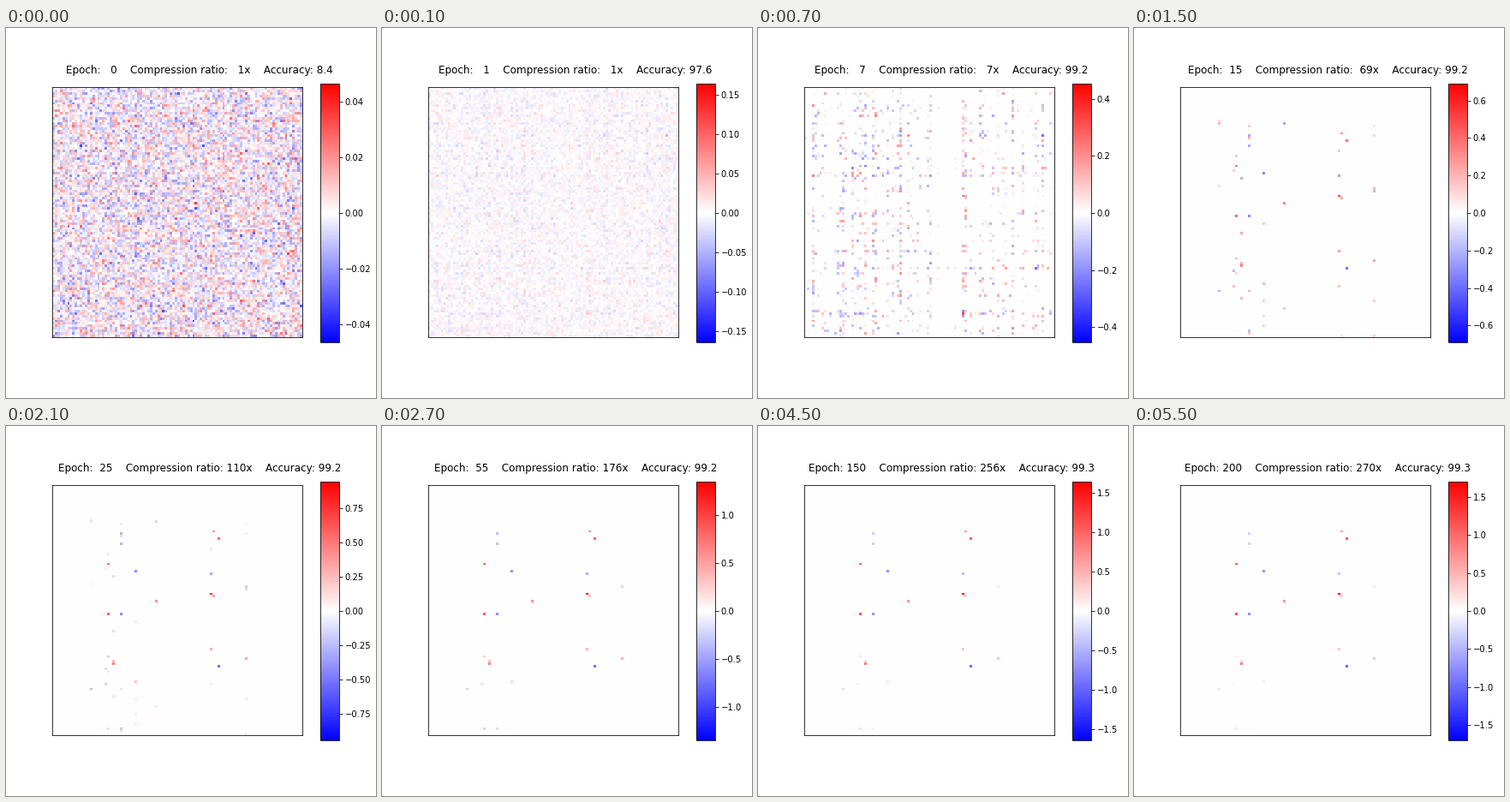
These frames come from a looping animation (432x432 px, 6.6 s). A matplotlib script:

```python
import numpy as np
import matplotlib.pyplot as plt
from matplotlib.animation import FuncAnimation

N = 100
EPOCHS = list(range(20)) + list(range(20, 101, 5)) + list(range(110, 201, 5))
HOLD = 10  # extra ticks on the last epoch

KEYS = [0, 4, 7, 15, 55, 110, 200]
LIMIT = [.0464, .3215, .4535, .69, 1.348, 1.584, 1.703]
RATIO = [1, 1, 7, 69, 176, 240, 270]

# Weights that survive: column, row, final share of the colour limit
SURVIVORS = [
    (27, 19, -.18), (27, 23, -.17), (22, 31, .62), (33, 34, -.42),
    (64, 18, .38), (66, 21, .62), (63, 35, -.24), (63, 43, 1),
    (64, 44, .2), (41, 46, .42), (22, 51, .68), (27, 51, -.42),
    (77, 40, .09), (63, 65, .22), (77, 69, .24), (66, 72, -.58),
    (22, 68, .1), (24, 70, .14), (24, 71, .5), (15, 81, -.12),
    (22, 97, .11), (33, 78, .08), (21, 79, .03), (27, 97, -.02)]

rng = np.random.default_rng(7)
start = .2 * rng.standard_normal((N, N))

# Some inputs and outputs carry larger weights than others
strong = np.unique([p[0] for p in SURVIVORS])
col_gain = np.exp(.35 * rng.standard_normal(N))
row_gain = np.exp(.25 * rng.standard_normal(N))
col_gain[strong] = np.clip(1.3 * col_gain[strong], 1.2, 1.7)
col_gain[51:63] *= .5
trained = .08 * rng.standard_normal((N, N)) * np.outer(row_gain, col_gain)
trained = np.clip(trained, -.7, .7)

# Weights of the strong columns that are pruned soon after epoch 15
fading = [(rng.choice(strong), rng.integers(12, N),
           rng.choice([-1, 1]) * rng.uniform(.06, .35)) for _ in range(30)]


def track(epoch, keys, values):
    """Interpolate on a logarithmic epoch scale."""
    return np.interp(np.log1p(epoch), np.log1p(keys), values)


def title(epoch):
    ratio = round(track(epoch, KEYS, RATIO))
    acc = 99.2 + .1 * (epoch > 80) - 90.8 * max(0, 1 - epoch / 4) ** 14
    return (f"Epoch: {epoch:3d}    Compression ratio: {ratio:3d}x"
            f"    Accuracy: {acc:.1f}")


def weights(epoch, top):
    """Weight matrix as a share of the colour limit."""
    cut = np.interp(epoch, [3, 4, 7, 10, 15], [.01, .06, .2, .32, 1.1])
    gate = np.clip((abs(trained) - .7 * cut) / (.4 * cut), 0, 1)
    w = trained * gate * min(1, epoch / 3)
    w += start * LIMIT[0] / top * max(0, 1 - epoch / 5)
    grown = np.clip((epoch - 1) / 4, 0, 1)
    for col, row, last in SURVIVORS:
        mid = np.sign(last) * (.25 + .5 * abs(last))
        amp = track(epoch, [1, 7, 15, 200], [0, .7 * mid, mid, last])
        w[row, col] += grown * (amp - w[row, col])
    for col, row, mid in fading:
        w[row, col] += track(epoch, [1, 7, 15, 40], [0, .7 * mid, mid, 0])
    return np.clip(w, -1, 1)


fig = plt.figure(figsize=(6, 6), dpi=72, facecolor="white")
ax = fig.add_axes([.125, 71.2 / 432, .675, .675])
image = ax.imshow(np.zeros((N, N)), cmap="bwr", interpolation="nearest",
                  vmin=-1, vmax=1)
ax.set_xticks([])
ax.set_yticks([])
fig.colorbar(image, cax=fig.add_axes([.85, .15, .05, .7]))
label = fig.text(.5235, .9, "", size=12, ha="center", va="top")


def draw(i):
    epoch = EPOCHS[min(i, len(EPOCHS) - 1)]
    top = track(epoch, KEYS, LIMIT)
    image.set_data(weights(epoch, top) * top)
    image.set_clim(-top, top)
    label.set_text(title(epoch))
    return image, label


anim = FuncAnimation(fig, draw, frames=len(EPOCHS) + HOLD, interval=100,
                     repeat=True, repeat_delay=0, blit=False)
plt.show()
```
